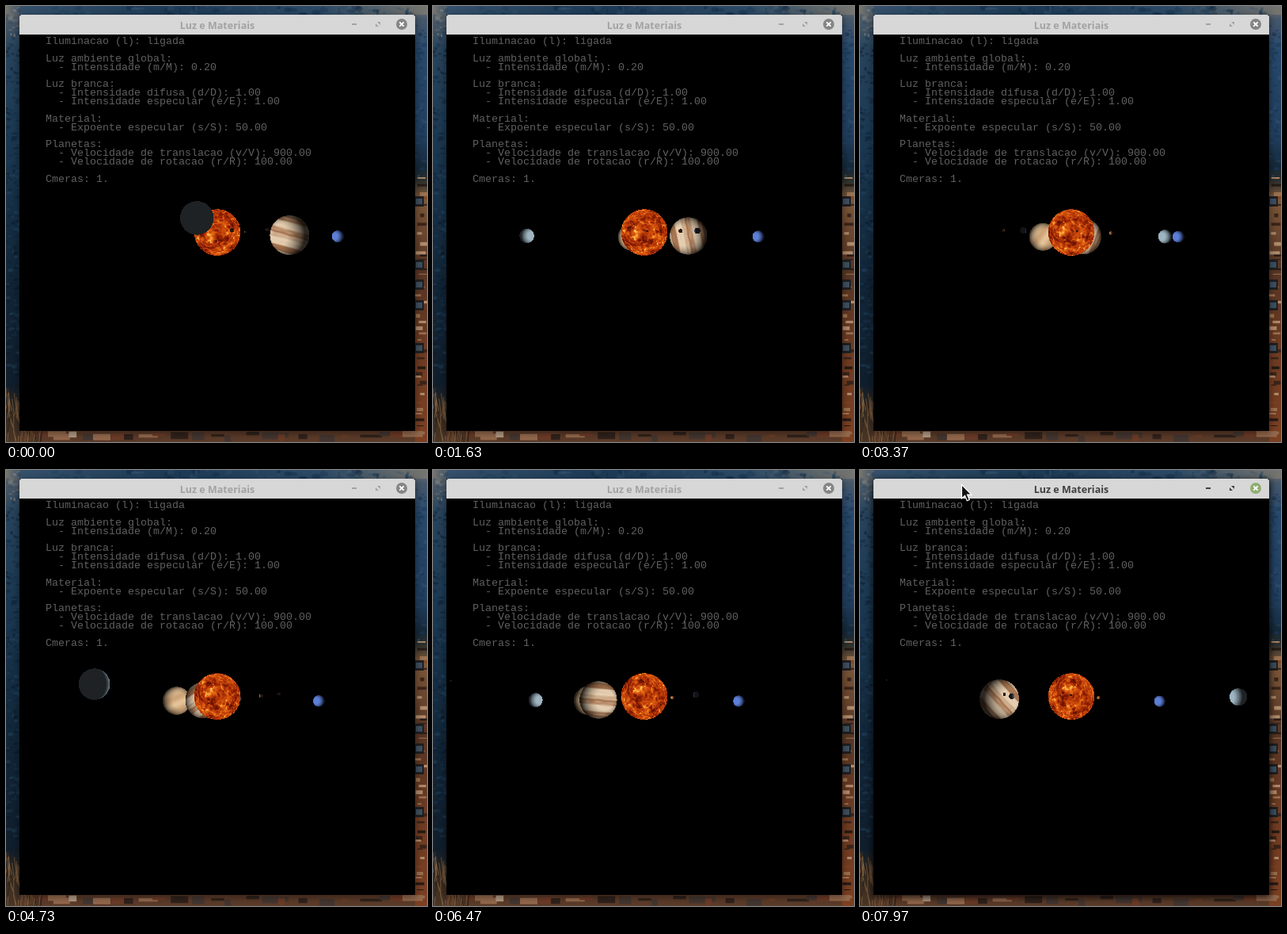
Write an HTML page with a canvas that moves like this. It is 532 px wide and 550 px high and loops after 8000 ms.

```html
<!DOCTYPE html>
<html lang="pt">
<head>
<meta charset="utf-8">
<title>Luz e Materiais</title>
<style>
html, body { margin: 0; width: 100%; height: 100%; overflow: hidden; background: #000; }
svg { position: absolute; left: 0; top: 0; }
canvas { position: absolute; left: 17px; top: 240px; }
.title { font: 700 12.5px "Open Sans", "Noto Sans", sans-serif; text-anchor: middle; }
.info { font: 13.33px "Liberation Mono", monospace; fill: #606060; white-space: pre; }
</style>
</head>
<body>
<svg id="stage" width="532" height="550" viewBox="0 0 532 550">
  <defs>
    <linearGradient id="left" x2="0" y2="1">
      <stop offset="0" stop-color="#6f6d68"/><stop offset=".03" stop-color="#4a5a68"/>
      <stop offset=".1" stop-color="#27435c"/><stop offset=".3" stop-color="#1b3852"/>
      <stop offset=".6" stop-color="#12273a"/><stop offset=".87" stop-color="#101e2c"/>
      <stop offset=".93" stop-color="#33281f"/><stop offset="1" stop-color="#4a3727"/>
    </linearGradient>
    <linearGradient id="right" x2="0" y2="1">
      <stop offset="0" stop-color="#76756f"/><stop offset=".03" stop-color="#46586c"/>
      <stop offset=".1" stop-color="#27486b"/><stop offset=".3" stop-color="#213f5f"/>
      <stop offset=".37" stop-color="#152838"/><stop offset=".4" stop-color="#2b2f2c"/>
      <stop offset=".44" stop-color="#7d5839"/><stop offset=".6" stop-color="#563524"/>
      <stop offset=".8" stop-color="#6e3b22"/><stop offset="1" stop-color="#7c4022"/>
    </linearGradient>
    <linearGradient id="top">
      <stop offset="0" stop-color="#77746e"/><stop offset=".04" stop-color="#34506a"/>
      <stop offset=".4" stop-color="#1d3a55"/><stop offset=".75" stop-color="#2c4a66"/>
      <stop offset="1" stop-color="#76756f"/>
    </linearGradient>
    <filter id="blur"><feGaussianBlur stdDeviation="4"/></filter>
  </defs>
  <g id="wall">
    <rect width="17" height="550" fill="url(#left)"/>
    <rect x="517" width="15" height="550" fill="url(#right)"/>
    <rect width="532" height="11" fill="url(#top)"/>
    <rect x="17" y="536" width="500" height="14" fill="#5b3b29"/>
  </g>
  <rect id="shadow" x="15" y="12" width="504" height="528" filter="url(#blur)"/>
  <path d="M17 36V14q0-3 3-3H514q3 0 3 3V36z" fill="#d7d7d7"/>
  <rect x="17" y="36" width="500" height="500"/>
  <g id="bar">
    <text class="title" x="267" y="28.5">Luz e Materiais</text>
    <path d="M437 22h6v2h-6zM469 20h4v4zM467 22v4h4z"/>
  </g>
  <circle id="close" cx="500" cy="23" r="7"/>
  <path d="M497.3 20.3l5.4 5.4m0-5.4l-5.4 5.4" stroke="#fff" stroke-width="1.8"/>
  <g id="info"></g>
  <path id="cursor" d="M0 0V17.5L4 13.8 6.8 20.3 9.8 19 7 12.6H12.3z" fill="#111" stroke="#fff" stroke-width="1.2"/>
</svg>
<canvas id="space" width="500" height="90"></canvas>
<script>
const $ = id => document.getElementById(id);
const LOOP = 8000, W = 500, H = 90, LEFT = 17, TOP = 240;
const FOCAL = 480, RAD = Math.PI / 180;
const ctx = $('space').getContext('2d');
const img = ctx.createImageData(W, H);

function add(parent, tag, attrs, text) {
  const el = document.createElementNS('http://www.w3.org/2000/svg', tag);
  for (const k in attrs) el.setAttribute(k, attrs[k]);
  if (text) el.textContent = text;
  parent.appendChild(el);
}

let seed = 7;
const rnd = () => (seed = seed * 16807 % 2147483647) / 2147483647;
const pick = list => list[Math.floor(rnd() * list.length)];

// Wallpaper details
function scatter(n, x, y, w, h, size, colors) {
  for (let i = 0; i < n; i++) {
    add($('wall'), 'ellipse', {
      cx: x + rnd() * w, cy: y + rnd() * h, rx: 1 + rnd() * size, ry: .7 + rnd() * size * .6,
      fill: pick(colors), opacity: .2 + rnd() * .35
    });
  }
}
const box = (x, y, width, height, fill) => add($('wall'), 'rect', { x, y, width, height, fill });

function drawWall() {
  scatter(25, 0, 0, 17, 40, 3, ['#8f8c86', '#46586a', '#75706a', '#2c4156']);
  scatter(220, 0, 40, 17, 430, 3, ['#0e1d2d', '#1a3850', '#254862', '#0b1825']);
  scatter(80, 17, 0, 500, 11, 5, ['#122a42', '#36536e', '#1e3d59']);
  scatter(70, 517, 20, 15, 195, 3, ['#1b385a', '#345577', '#182e48']);
  for (let y = 216; y < 536; y += 4 + rnd() * 9)
    box(517 + rnd() * 7, y, 5 + rnd() * 8, 1 + rnd() * 4, pick(['#9a7150', '#3a241a', '#b08b6c', '#80472a', '#261a15']));
  for (const y of [240, 320, 345, 371, 425]) {
    box(517, y, 11, 13, '#1f2022');
    box(518, y + 3, 8, 7, '#3e5060');
  }
  for (let x = 40; x < 517; x += 6 + rnd() * 22)
    box(x, 536 + rnd() * 6, 8 + rnd() * 20, 3 + rnd() * 7, pick(['#94694d', '#30221b', '#6d3b27', x < 160 ? '#b59c86' : '#7a5238', '#443630']));
  for (let i = 0; i < 70; i++) {
    const x = rnd() * 42, y = 550 - rnd() * 85 * (1 - x / 55);
    add($('wall'), 'path', {
      d: `M${x} ${y + 22}L${x + rnd() * 12 - 6} ${y}`,
      stroke: pick(['#7a5a3b', '#2b2018', '#8a6744', '#4a3424']), 'stroke-width': .8
    });
  }
}

function drawInfo() {
  const lines = [
    'Iluminacao (l): ligada', '', 'Luz ambiente global:', '  - Intensidade (m/M): 0.20', '',
    'Luz branca:', '  - Intensidade difusa (d/D): 1.00', '  - Intensidade especular (e/E): 1.00', '',
    'Material:', '  - Expoente especular (s/S): 50.00', '', 'Planetas:',
    '  - Velocidade de translacao (v/V): 900.00', '  - Velocidade de rotacao (r/R): 100.00', '', 'Cmeras: 1.'
  ];
  lines.forEach((line, i) => {
    if (line) add($('info'), 'text', { class: 'info', x: 50, y: Math.round(48 + i * 10.87) }, line);
  });
}

// Procedural surfaces
const mix = (a, b, k) => a + (b - a) * k;
const clamp = (v, a = 0, b = 1) => Math.min(b, Math.max(a, v));
const blend = (a, b, k) => a.map((v, i) => mix(v, b[i], k));

function hash(x, y, z) {
  const v = Math.sin(x * 12.9898 + y * 78.233 + z * 37.719) * 43758.5453;
  return v - Math.floor(v);
}
function noise(x, y, z) {
  const i = Math.floor(x), j = Math.floor(y), k = Math.floor(z);
  const ease = f => f * f * (3 - 2 * f);
  const u = ease(x - i), v = ease(y - j), w = ease(z - k);
  const row = (b, c) => mix(hash(i, b, c), hash(i + 1, b, c), u);
  return mix(mix(row(j, k), row(j + 1, k), v), mix(row(j, k + 1), row(j + 1, k + 1), v), w);
}
function ramp(stops, v) {
  const p = clamp(v) * (stops.length - 1), i = Math.min(Math.floor(p), stops.length - 2);
  return blend(stops[i], stops[i + 1], p - i);
}

const FIRE = [[84, 12, 2], [146, 34, 4], [198, 68, 10], [232, 112, 22], [255, 208, 90]];
function sunSkin(x, y, z, t) {
  const a = t * 13 * RAD, c = Math.cos(a), s = Math.sin(a);
  const u = x * c + y * s, v = y * c - x * s;
  const n = noise(u * 3 + 9, v * 3 + 5, z * 3 + 3);
  const m = noise(u * 12 + n * 3, v * 12 + 20, z * 12);
  const vein = 1 - Math.abs(2 * noise(u * 4 + m * .8 + 31, v * 4 + 14, z * 4 + 2) - 1);
  return ramp(FIRE, n * .6 + m * .55 + Math.pow(vein, 8) * .4 - .24);
}

// Direction of the cloud bands: [seconds, degrees]
const TILT = [[0, 15], [1.63, 78], [2.63, 95], [6.47, 185], [8, 228]];
function tilt(t) {
  const i = Math.max(1, TILT.findIndex(k => k[0] >= t));
  const [a, b] = [TILT[i - 1], TILT[i]];
  return mix(a[1], b[1], (t - a[0]) / (b[0] - a[0])) * RAD;
}
function bands(x, y, t) {
  const a = tilt(t), c = Math.cos(a), s = Math.sin(a);
  return [x * c + y * s, y * c - x * s];
}
function jupiterSkin(x, y, z, t) {
  const [u, v] = bands(x, y, t);
  const n = noise(u * 3 + 5, v * 9 + 10, z * 2);
  const w = .5 + .5 * Math.sin(v * 8 + 1.3 + Math.sin(v * 21) * .6 + n * 1.2);
  return blend([218, 196, 168], [146, 92, 56], Math.pow(w, 2) * .85);
}
function saturnSkin(x, y, z, t) {
  const v = bands(x, y, Math.min(t + .5, 8))[1];
  return blend([218, 186, 146], [194, 156, 114], .5 + .5 * Math.sin(v * 7));
}
const plain = (...rgb) => () => rgb;

// Bodies: orbit radius, starting angle, degrees per second, size, skin
const body = (orbit, start, speed, size, skin) => ({ orbit, start, speed, size, skin });
const BODIES = [
  body(0, 0, 0, 29.3, sunSkin),
  body(.077, 68, 623.7, 1.2, plain(120, 100, 88)),
  body(.115, 17, 240.9, 2.4, plain(180, 110, 64)),
  body(.155, 173.3, 148.3, 3.6, plain(84, 92, 118)),
  body(.19, 36, 78.8, 1.8, plain(130, 78, 56)),
  body(.296, 130, 12.5, 29.7, jupiterSkin),
  body(.37, 178.7, 5.1, 23.8, saturnSkin),
  body(.458, -3.8, 147.85, 11.5, plain(150, 172, 184)),
  body(.51, 126, 1.82, 9.9, plain(88, 120, 204)),
  body(.547, -37, 1.23, .4, plain(255, 240, 225))
];

function place(b, t) {
  const a = (b.start + b.speed * t) * RAD, sin = Math.sin(a), cos = Math.cos(a);
  const scale = 1 / (1 - b.orbit * cos);
  const dx = FOCAL * b.orbit * sin * scale, view = Math.atan(dx / FOCAL);
  return {
    b, scale, x: 267 + dx - LEFT, y: 307.2 - 21.6 * scale - TOP, r: b.size * scale,
    lx: -sin * Math.cos(view) - cos * Math.sin(view),
    lz: sin * Math.sin(view) - cos * Math.cos(view)
  };
}

function paint({ b, x, y, r, lx, lz }, t) {
  const R = Math.max(r, .55);
  for (let j = Math.max(0, Math.floor(y - R)); j <= Math.min(H - 1, y + R); j++) {
    for (let i = Math.max(0, Math.floor(x - R)); i <= Math.min(W - 1, x + R); i++) {
      const nx = (i + .5 - x) / R, ny = (j + .5 - y) / R, d = nx * nx + ny * ny;
      if (d > 1) continue;
      const nz = Math.sqrt(1 - d);
      const light = b.orbit ? Math.min(1.05, .2 + Math.max(0, nx * lx + nz * lz)) : 1;
      const rgb = b.skin(nx, ny, nz, t), p = (j * W + i) * 4;
      for (let k = 0; k < 3; k++) img.data[p + k] = rgb[k] * light;
    }
  }
}

function render(ms) {
  const t = ms / 1000, active = t >= 7.7;
  for (let p = 0; p < img.data.length; p += 4) {
    img.data[p] = img.data[p + 1] = img.data[p + 2] = 0;
    img.data[p + 3] = 255;
  }
  BODIES.map(b => place(b, t)).sort((a, b) => a.scale - b.scale).forEach(p => paint(p, t));
  ctx.putImageData(img, 0, 0);

  $('bar').setAttribute('fill', active ? '#3f3f3f' : '#a2a2a2');
  $('close').setAttribute('fill', active ? '#90ad72' : '#858585');
  $('shadow').setAttribute('opacity', active ? .7 : .35);
  const k = 1 - Math.pow(1 - clamp((t - 7.35) / .4), 2);
  $('cursor').setAttribute('transform', `translate(${mix(142, 128.5, k)} ${mix(-24, 18.5, k)})`);
}

drawWall();
drawInfo();
const begin = performance.now();
function tick() {
  render((performance.now() - begin) % LOOP);
  requestAnimationFrame(tick);
}
tick();
</script>
</body>
</html>
```
